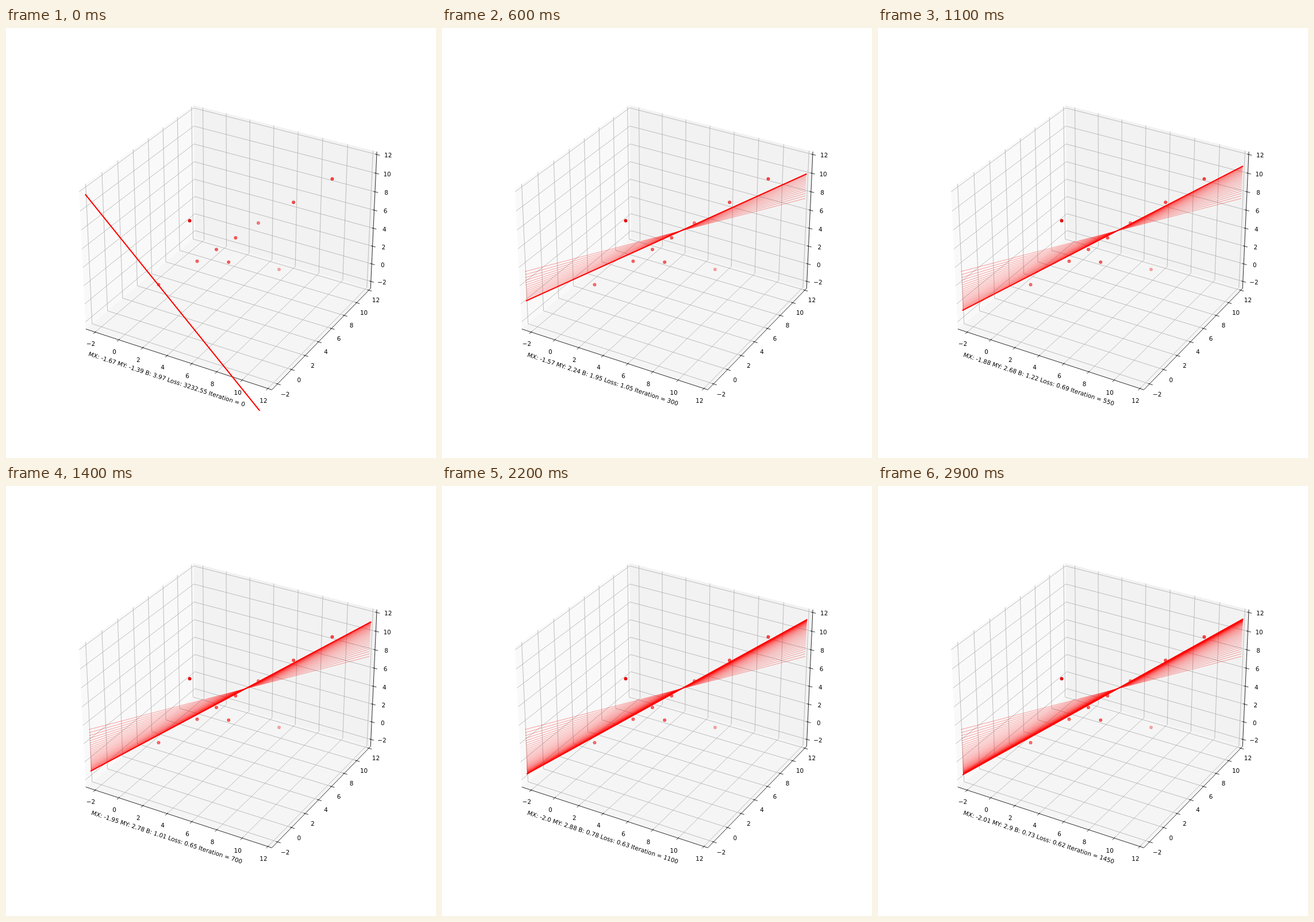
An HTML page with a canvas for the animation above (3000 ms loop, 748 by 748 pixels).

```html
<!DOCTYPE html>
<html>
<head>
<meta charset="utf-8">
<style>
html, body { margin: 0; width: 100%; height: 100%; overflow: hidden; background: #fff; }
canvas { display: block; }
</style>
</head>
<body>
<canvas id="plot" width="748" height="748"></canvas>
<script>
const ctx = document.getElementById('plot').getContext('2d');
const PT = 1.039;                       // pixels per point
const MIN = -2.5, MAX = 12, RANGE = MAX - MIN;
const LO = MIN - RANGE / 48, HI = MAX + RANGE / 48;
const TICKS = [-2, 0, 2, 4, 6, 8, 10, 12];
const LABEL_GAP = 0.6016, TITLE_GAP = 1.3077;
const DEG = Math.PI / 180, ELEV = 30 * DEG, AZIM = -60 * DEG;
const ce = Math.cos(ELEV), se = Math.sin(ELEV), ca = Math.cos(AZIM), sa = Math.sin(AZIM);

// Screen x, y and opacity of the data points.
const DOTS = [
  [475, 420, .3], [439, 339.2, .45], [265.5, 446.5, .52], [332.5, 405.7, .56],
  [366, 385.3, .58], [399.4, 365, .6], [387.3, 407.3, .58], [500.2, 303.3, .65],
  [567.5, 262.5, .7], [319.5, 335.2, 1]
];

function project([x, y, z]) {
  const unit = v => (v - MIN) / RANGE - 0.5;
  const px = unit(x) * 8 / 7, py = unit(y) * 8 / 7, pz = unit(z) * 6 / 7;
  const right = -sa * px + ca * py;
  const up = -se * (ca * px + sa * py) + ce * pz;
  const depth = 10 - ce * (ca * px + sa * py) - se * pz;
  return [391.1 + 3113.5 * right / depth, 369.9 - 3113.5 * up / depth];
}

function trace(points) {
  ctx.beginPath();
  points.forEach(p => ctx.lineTo(...project(p)));
}

function stroke(points, color, width) {
  trace(points);
  ctx.strokeStyle = color;
  ctx.lineWidth = width;
  ctx.stroke();
}

function pane(color, points) {
  trace(points);
  ctx.fillStyle = color;
  ctx.fill();
}

// Each axis: place on its edge (shifted outward), tick mark ends, grid line.
const AXES = [
  { edge: (v, d) => [v, LO - d, LO - d], tick: (v, d) => [v, LO - d, LO],
    grid: v => [[v, LO, LO], [v, HI, LO], [v, HI, HI]] },
  { edge: (v, d) => [HI + d, v, LO - d], tick: (v, d) => [HI + d, v, LO],
    grid: v => [[HI, v, LO], [LO, v, LO], [LO, v, HI]] },
  { edge: (v, d) => [HI + d, HI + d, v], tick: (v, d) => [HI + d, HI, v],
    grid: v => [[LO, LO, v], [LO, HI, v], [HI, HI, v]] }
];

function drawAxes(title) {
  pane('#f9f9f9', [[LO, LO, LO], [LO, HI, LO], [LO, HI, HI], [LO, LO, HI]]);
  pane('#f2f2f2', [[LO, HI, LO], [HI, HI, LO], [HI, HI, HI], [LO, HI, HI]]);
  pane('#f5f5f5', [[LO, LO, LO], [HI, LO, LO], [HI, HI, LO], [LO, HI, LO]]);

  ctx.font = 10 * PT + 'px "DejaVu Sans", sans-serif';
  ctx.textAlign = 'center';
  for (const { grid } of AXES) TICKS.forEach(v => stroke(grid(v), '#b0b0b0', 0.8 * PT));
  for (const { edge, tick } of AXES) {
    stroke([edge(LO, 0), edge(HI, 0)], '#000', 0.8 * PT);
    for (const v of TICKS) {
      stroke([tick(v, -RANGE / 120), tick(v, RANGE / 60)], '#000', 0.8 * PT);
      const [x, y] = project(edge(v, LABEL_GAP));
      ctx.fillStyle = '#000';
      ctx.fillText(String(v).replace('-', '\u2212'), x, y + 7.9);
    }
  }

  const [x0, y0] = project([LO, LO, LO]), [x1, y1] = project([HI, LO, LO]);
  ctx.save();
  ctx.translate(...project(AXES[0].edge((MIN + MAX) / 2, TITLE_GAP)));
  ctx.rotate(Math.atan2(y1 - y0, x1 - x0));
  ctx.fillText(title, 0, 2.8);
  ctx.restore();
}

function drawDots() {
  ctx.lineWidth = 1.3;
  ctx.fillStyle = '#f00';
  ctx.strokeStyle = '#e01010';
  for (const [x, y, alpha] of DOTS) {
    ctx.globalAlpha = alpha;
    ctx.beginPath();
    ctx.arc(x, y, 2.33, 0, 7);
    ctx.fill();
    ctx.stroke();
  }
  ctx.globalAlpha = 1;
}

// Gradient descent as two decaying modes around the optimum.
function model(n) {
  if (n === 0) return { mx: -1.67, my: -1.39, b: 3.97, loss: 3232.55 };
  const slow = Math.exp(-0.00355 * (n - 100)), fast = Math.exp(-0.006 * (n - 100));
  return {
    mx: -2.015 + 0.395 * slow + 0.82 * fast,
    my: 2.905 - 0.837 * slow - 0.828 * fast,
    b: 0.707 + 2.54 * slow - 0.035 * fast,
    loss: 0.6245 + 1.56 * slow ** 2 + 0.5555 * fast ** 2
  };
}

function drawFit(n, width) {
  const { mx, my, b } = model(n);
  const at = v => [v, v, (mx + my) * v + b];
  stroke([at(MIN), at(MAX)], '#f00', width);
}

function round2(v) {
  const r = Math.round(v * 100) / 100;
  return Number.isInteger(r) ? r + '.0' : String(r);
}

function draw(iteration) {
  const { mx, my, b, loss } = model(iteration);
  ctx.clearRect(0, 0, 748, 748);
  drawAxes(`MX: ${round2(mx)} MY: ${round2(my)} B: ${round2(b)} Loss: ${round2(loss)} Iteration = ${iteration}`);
  drawDots();
  ctx.save();
  ctx.beginPath();
  ctx.rect(95.3, 89.8, 576, 576);
  ctx.clip();
  ctx.lineCap = 'square';
  for (let n = 10; n < iteration; n += 20) drawFit(n, 0.4);
  drawFit(iteration, 2 * PT);
  ctx.restore();
}

function loop() {
  draw(Math.floor(performance.now() % 3000 / 100) * 50);
  requestAnimationFrame(loop);
}
loop();
</script>
</body>
</html>
```
